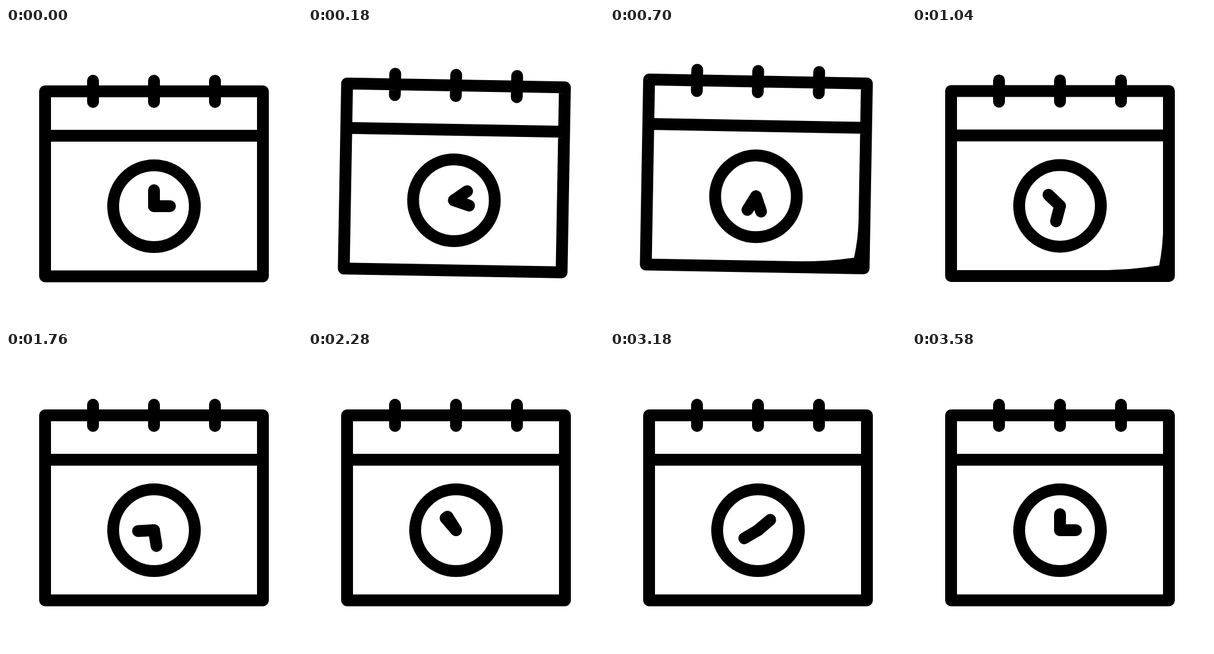
An HTML page for the animation above (3.6 s loop, 500 by 500 pixels).

```html
<!DOCTYPE html>
<html lang="en">
<head>
<meta charset="utf-8">
<title>Calendar clock</title>
<style>
  html, body { margin: 0; width: 100%; height: 100%; overflow: hidden; background: #fff; }
  svg { display: block; width: 100vw; height: 100vh; }
  .ink { fill: none; stroke: #000; stroke-width: 20; stroke-linecap: round; stroke-linejoin: round; }
</style>
</head>
<body>
<svg viewBox="0 0 500 500">
  <g id="calendar">
    <path id="curl"/>
    <g class="ink">
      <path d="M66 107H434V419.5H66ZM66 182H434M147 89V125M250 89V125M353 89V125"/>
      <circle cx="250" cy="301" r="69"/>
      <path id="minute" d="M250 301V274"/>
      <path id="hour" d="M250 301V274"/>
    </g>
  </g>
</svg>
<script>
  const LOOP = 3600, STEP = 20, SPAN = LOOP - STEP;
  const $ = id => document.getElementById(id);
  const calendar = $('calendar'), curl = $('curl'), minute = $('minute'), hour = $('hour');

  // [time in ms, value]
  const lift = [[0, 0], [350, -19], [580, -19], [1100, 0]];
  const swing = [[0, 0], [200, 1.05], [470, -1.05], [720, 1.05], [980, 0]];
  const bend = [[450, 0], [870, 1], [1290, 0]];

  const ease = x => (1 - Math.cos(Math.PI * x)) / 2;

  function sample(track, t) {
    if (t <= track[0][0]) return track[0][1];
    for (let i = 1; i < track.length; i++) {
      const [t0, a] = track[i - 1], [t1, b] = track[i];
      if (t < t1) return a + (b - a) * ease((t - t0) / (t1 - t0));
    }
    return track[track.length - 1][1];
  }

  function curlPath(k) {
    if (k < 0.01) return '';
    const x = 424 - 10 * k, y = 409.5 - 12 * k;
    return `M424.5 331Q424 370 ${x} ${y}Q372 409 330 409.5V412H427V331Z`;
  }

  const turn = (hand, deg) => hand.setAttribute('transform', `rotate(${deg} 250 301)`);

  function draw(t) {
    const p = t / SPAN;
    calendar.setAttribute('transform',
      `translate(0 ${sample(lift, t)}) rotate(${sample(swing, t)} 250 107)`);
    curl.setAttribute('d', curlPath(sample(bend, t)));
    turn(minute, 1080 * p);
    turn(hour, 90 + 360 * p);
  }

  const start = performance.now();
  function tick() {
    const t = (performance.now() - start) % LOOP;
    draw(Math.floor(t / STEP) * STEP);
    requestAnimationFrame(tick);
  }
  draw(0);
  requestAnimationFrame(tick);
</script>
</body>
</html>
```
